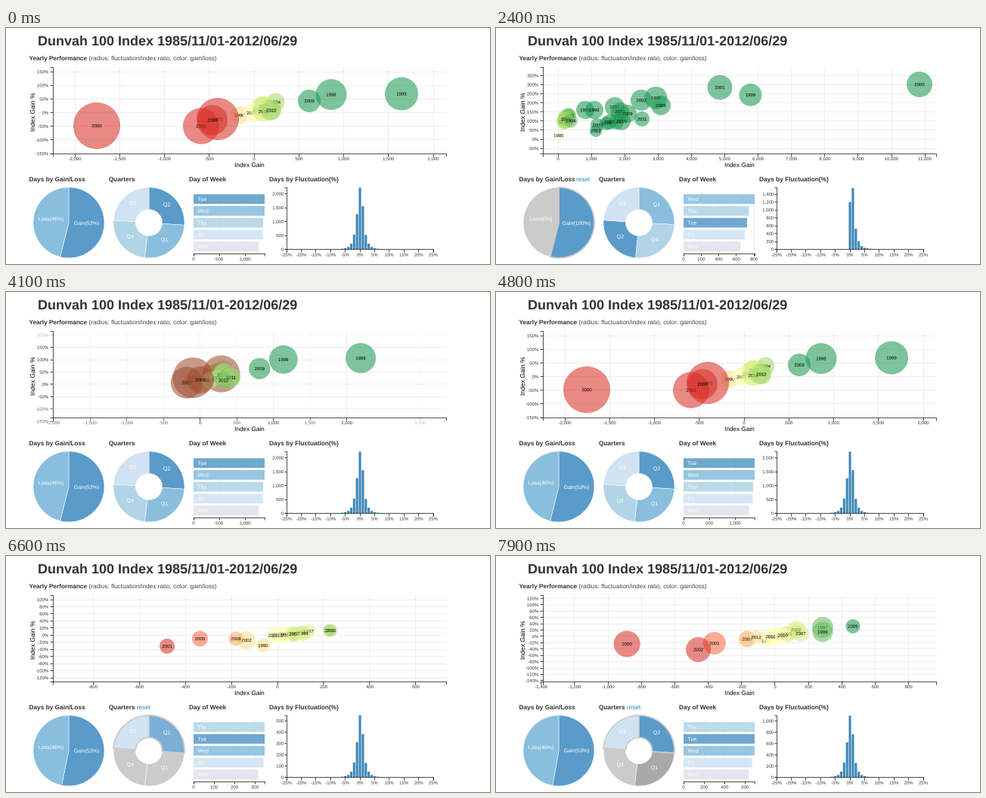
Recreate the animation shown at these times as a matplotlib script. Size 640x314 px, loop 8000 ms.

```python
import numpy as np
import matplotlib.pyplot as plt
from matplotlib.animation import FuncAnimation
from matplotlib.collections import PathCollection
from matplotlib.colors import to_rgb
from matplotlib.patches import Wedge
from matplotlib.path import Path
from matplotlib.textpath import TextPath

W, H, DPI = 640, 314, 100
FRAMES, STEP = 80, 100
PT = 72 / DPI

RD_YL_GN = ["#d73027", "#f46d43", "#fdae61", "#fee08b", "#ffffbf",
            "#d9ef8b", "#a6d96a", "#66bd63", "#1a9850"]
BLUES = ["#3182bd", "#6baed6", "#9ecae1", "#c6dbef", "#dadaeb"]
DAY_COLOR = dict(zip(["Tue", "Wed", "Thu", "Fri", "Mon"], BLUES))
SLICE_COLOR = dict(zip(["Q2", "Q1", "Q4", "Q3"], BLUES), Gain=BLUES[0], Loss=BLUES[1])
YEARS = range(1985, 2013)

# Filter clicks: time in ms, then the view they lead to
CLICKS = [(840, "gain"), (3225, "all"), (4916, "q3"), (6520, "q23")]
SLOW, FAST = 1500, 750

# Scales: pixel of zero, pixels per unit, first tick, last tick, tick step
X_SCALE = {"all": (328, .1185, -2000, 2000, 500), "gain": (82, .0441, 0, 11000, 1000),
           "q3": (359, .305, -800, 600, 200), "q23": (369, .2207, -1400, 800, 200)}
Y_SCALE = {"all": (112.6, -.363, -150, 150, 50), "gain": (148, -.242, -50, 350, 50),
           "q3": (105.3, -.4727, -120, 100, 20), "q23": (107, -.42, -140, 120, 20)}
ROW_SCALE = {"all": (248, .0682, 0, 1000, 500), "gain": (248, .1163, 0, 800, 200),
             "q3": (248, .271, 0, 300, 100), "q23": (248, .1355, 0, 600, 200)}
BAR_SCALE = {"all": (294.5, -.037, 0, 2000, 500), "gain": (294.5, -.0525, 0, 1400, 200),
             "q3": (294.5, -.151, 0, 500, 100), "q23": (294.5, -.075, 0, 1000, 200)}

# Bubbles that stand clear of the cluster: x, y, radius
BUBBLES = {
    "all": {2000: (120, 130, 31), 2001: (280, 121, 28), 2002: (258, 130.5, 24),
            2008: (273, 122.5, 20), 1990: (309, 116, 12), 2005: (325, 113, 12),
            2010: (349, 109, 14), 2011: (340, 111, 14), 2012: (351, 109.5, 13),
            2009: (401, 97, 15), 1998: (430, 88.5, 20.5), 1999: (523, 87.5, 22),
            1985: (331, 111, 7)},
    "gain": {2000: (560, 75, 17), 2001: (296, 79, 16.5), 1999: (336.5, 89, 15),
             2002: (192, 96, 14), 1998: (211.5, 93, 15), 2008: (218, 103, 13),
             1997: (157, 105, 13), 1996: (130, 109, 12), 1995: (118, 109, 12),
             2003: (164, 111, 12), 2009: (174, 114, 12), 2010: (166, 124, 12),
             2011: (193, 121, 10), 2004: (159, 125, 10), 2005: (134, 129, 9),
             2006: (146, 127, 9), 2007: (150, 125, 10), 2012: (132, 137, 8),
             1994: (99, 123.5, 9), 1990: (90, 125, 10), 1985: (83, 143, 5)},
    "q3": {2001: (213, 120, 10), 2000: (256.5, 110, 10.5), 2008: (304, 110, 9.5),
           2002: (318, 112, 12), 1990: (340, 119, 9), 2011: (353, 105.5, 9),
           1998: (360, 106, 10), 2012: (359, 105.3, 5), 2006: (367, 104.5, 8),
           2007: (381, 103.5, 10), 1999: (393, 103, 10), 1997: (400, 100, 9),
           2009: (427, 99, 8), 2010: (429.5, 99, 8.5)},
    "q23": {2000: (173, 117, 17.5), 2002: (267.5, 124.5, 16.5), 2001: (289, 116, 15),
            2008: (332, 110.5, 11), 2012: (344, 108, 9), 1990: (358, 113, 8),
            2011: (363, 107, 9), 2010: (379, 105.5, 11), 2007: (403, 103, 11),
            1996: (397, 98, 12), 1997: (432, 95, 14), 1999: (432, 101, 13.5),
            2009: (472, 93.5, 9.5)},
}
# Everyone else: cluster centre, half spread and smallest radius
CLUSTER = {"all": (344, 104, 15, -7, 10), "gain": (96, 116, 4, -6, 8),
           "q3": (375, 103.5, 18, -3, 6.5), "q23": (380, 104.5, 19, -5, 7.5)}

ROWS = {"all": (["Tue", "Wed", "Thu", "Fri", "Mon"], [94, 94, 92, 91.5, 86.5]),
        "gain": (["Wed", "Thu", "Tue", "Fri", "Mon"], [94, 86.5, 84, 81, 75.5]),
        "q3": (["Wed", "Thu", "Tue", "Fri", "Mon"], [94, 94, 94, 92.5, 85.5]),
        "q23": (["Thu", "Tue", "Wed", "Fri", "Mon"], [94, 94, 94, 90.5, 86])}
QUARTERS = {"all": (["Q2", "Q1", "Q4", "Q3"], [0, 94, 187, 274, 360]),
            "gain": (["Q1", "Q4", "Q2", "Q3"], [0, 93, 185.5, 274, 360])}
QUARTERS["q3"] = QUARTERS["q23"] = QUARTERS["all"]
GAIN_END = {"all": 194, "gain": 194, "q3": 191.5, "q23": 190}
PICKED = {"all": [], "gain": ["Gain"], "q3": ["Q3"], "q23": ["Q2", "Q3"]}

PCT = np.arange(-7, 9)
SHAPE = np.array([10, 22, 45, 90, 205, 530, 1260, 2220, 1550, 520, 205, 85, 42, 24, 14, 6])
COUNTS = {"all": SHAPE, "gain": np.where(PCT < 0, 0, np.where(PCT == 0, 1200, SHAPE)),
          "q3": SHAPE * .246, "q23": SHAPE * .4923}

rng = np.random.default_rng(7)
JITTER = {y: rng.uniform(-1, 1, 3) for y in YEARS}


def bubble(view, year):
    """x, y, radius and colour of a year's bubble."""
    if year in BUBBLES[view]:
        x, y, r = BUBBLES[view][year]
    else:
        cx, cy, sx, sy, r0 = CLUSTER[view]
        u, v, w = JITTER[year]
        x, y, r = cx + sx * u, cy + sy * u + 1.5 * v, r0 + 2 * (w + 1)
    zero, k = X_SCALE[view][:2]
    shade = int(np.clip(((x - zero) / k + 500) / 1000 * 9, 0, 8))
    return np.array([x, y, r, *to_rgb(RD_YL_GN[shade])])


PLACED = {v: {y: bubble(v, y) for y in YEARS} for v in X_SCALE}

fig = plt.figure(figsize=(W / DPI, H / DPI), dpi=DPI, facecolor="white")
ax = fig.add_axes([0, 0, 1, 1])
ax.set(xlim=(0, W), ylim=(H, 0))
ax.axis("off")
# The whole picture is one collection of paths, painted in order
scene = PathCollection([Path([(0, 0), (1, 1)])], transform=ax.transData, snap=False)
ax.add_collection(scene, autolim=False)
shapes = []
glyphs = {}
CLEAR = (0, 0, 0, 0)


def ease(t):
    t = min(max(t, 0), 1)
    return 4 * t ** 3 if t < .5 else 1 - 4 * (1 - t) ** 3


def mix(a, b, p):
    return np.asarray(a) * (1 - p) + np.asarray(b) * p


def tint(color, alpha):
    return mix((1, 1, 1), to_rgb(color), alpha)


def rgba(color, alpha=1):
    return (*to_rgb(color), alpha)


def fill(path, face, edge=CLEAR, width=0):
    shapes.append((path, face, edge, width * PT))


def rect(x, y, w, h, color):
    fill(Path([(x, y), (x + w, y), (x + w, y + h), (x, y + h), (x, y)]), rgba(color))


def line(xs, ys, color="#222222", alpha=1):
    points = np.floor(np.column_stack([xs, ys])) + .5
    fill(Path(points), CLEAR, rgba(color, alpha), .8)


def text(x, y, s, size=6, color="#333333", ha="left", alpha=1, bold=False, upright=False):
    key = s, bold
    if key not in glyphs:
        font = {"family": "Liberation Sans", "weight": "bold" if bold else "normal"}
        path = TextPath((0, 0), s, size=100, prop=font)
        box = path.get_extents()
        glyphs[key] = path.vertices / 100, path.codes, box.x0 / 100, box.x1 / 100
    points, codes, x0, x1 = glyphs[key]
    shift = {"left": 0, "center": (x0 + x1) / 2, "right": x1}[ha]
    u, v = (points[:, 0] - shift) * size, (points[:, 1] - .36) * size
    place = (x - v, y - u) if upright else (x + u, y - v)
    fill(Path(np.column_stack(place), codes), rgba(color, alpha))


def ticks(scales, old, new, p):
    """Position, value and opacity of each tick while a scale changes."""
    a, b = scales[old], scales[new]
    va, vb = (set(range(s[2], s[3] + 1, s[4])) for s in (a, b))
    zero, k = mix(a[:2], b[:2], p)
    for v in sorted(va | vb):
        alpha = 1 if v in va and v in vb else p if v in vb else 1 - p
        if alpha > .01:
            yield zero + k * v, v, alpha


def bubble_chart(old, new, p):
    xs = list(ticks(X_SCALE, old, new, p))
    ys = list(ticks(Y_SCALE, old, new, p))
    for x, _, a in xs:
        if 62 < x < 582:
            line([x, x], [52, 167], "#eaeaea", a)
    for y, _, a in ys:
        if 52 < y < 167:
            line([62, 582], [y, y], "#eaeaea", a)
    for year in YEARS:
        x, y, r, *rgb = mix(PLACED[old][year], PLACED[new][year], p)
        fill(Path.circle((x, y), r), (*rgb, .57))
        text(x, y, str(year), 6, "black", "center")
    line([58, 62, 62, 58], [52, 52, 167, 167])
    line([62, 62, 582, 582], [171, 167, 167, 171])
    for x, v, a in xs:
        if 38 < x < 612:
            line([x, x], [167, 171], alpha=a)
            text(x, 173.8, f"{v:,}", ha="center", alpha=a)
    for y, v, a in ys:
        if 48 < y < 178:
            line([58, 62], [y, y], alpha=a)
            text(56, y, f"{v}%", ha="right", alpha=a)
    text(322, 182, "Index Gain", 8.2, "black", "center")
    text(35, 112, "Index Gain %", 8.6, "black", "center", upright=True)


def pie(cx, inner, names, edges, colors, labels, picked, hover):
    cy, outer = 259, 47
    parts = list(zip(names, edges, edges[1:], colors))
    for name, a, b, color in sorted(parts, key=lambda part: part[0] in picked):
        on = name in picked
        if picked and not on:
            face = "#a9a9a9" if name == hover else "#cbcbcb"
        else:
            face = tint(color, .64 if name == hover else .8)
        ring = Wedge((cx, cy), outer, a - 90, b - 90, width=outer - inner)
        fill(ring.get_path(), rgba(face), rgba("#cccccc" if on else "white"),
             1.8 if on else .5)
    for name, a, b, _ in parts:
        mid, r = np.radians((a + b) / 2), (outer + inner) / 2
        text(cx + r * np.sin(mid), cy - r * np.cos(mid) - 2.4, labels.get(name, name),
             7, "white", "center")


def pies(old, new, p, hover):
    picked = PICKED[new]
    names = ["Gain", "Loss"]
    share = (100, 0) if new == "gain" else (53, 46)
    labels = {n: f"{n}({s}%)" for n, s in zip(names, share)}
    edges = [0, mix(GAIN_END[old], GAIN_END[new], p), 360]
    pie(83, 0, names, edges, [SLICE_COLOR[n] for n in names], labels,
        [n for n in picked if n in names], hover)
    (na, ea), (nb, eb) = QUARTERS[old], QUARTERS[new]
    colors = [mix(to_rgb(SLICE_COLOR[a]), to_rgb(SLICE_COLOR[b]), p) for a, b in zip(na, nb)]
    pie(189, 17.5, nb, mix(ea, eb, p), colors, {}, [n for n in picked if n in nb], hover)


def row_chart(old, new, p):
    marks = [m for m in ticks(ROW_SCALE, old, new, p) if m[0] < 360]
    for x, _, a in marks:
        line([x, x], [217, 300], "#eaeaea", a)
    names, widths = ROWS[new][0], mix(ROWS[old][1], ROWS[new][1], p)
    for i, (name, w) in enumerate(zip(names, widths)):
        y = 221.2 + 15.75 * i
        rect(248, y, w, 12.8, tint(DAY_COLOR[name], .7))
        text(253.5, y + 6.4, name, 7, "white")
    line([248, 248, 342, 342], [303, 300, 300, 303])
    for x, v, a in marks:
        line([x, x], [300, 303], alpha=a)
        text(x, 307.3, f"{v:,}", ha="center", alpha=a)


def histogram(old, new, p):
    base = BAR_SCALE[new][0]
    before, after = (COUNTS[v] * -BAR_SCALE[v][1] for v in (old, new))
    for pct, h in zip(PCT, mix(before, after, p)):
        if h > .2:
            rect(466.5 + 3.88 * pct, base - h, 3.1, h, "#3d86b8")
    line([368, 371, 371, 368], [212, 212, base, base])
    line([371, 371, 565, 565], [298, base, base, 298])
    for y, v, a in ticks(BAR_SCALE, old, new, p):
        if 206 < y < 300:
            line([368, 371], [y, y], alpha=a)
            text(367, y, f"{v:,}", ha="right", alpha=a)
    for pct in range(-25, 26, 5):
        x = 468 + 3.88 * pct
        line([x, x], [base, 298])
        text(x, 301.6, f"{pct}%", ha="center")


def headings(view):
    text(42, 16.7, "Dunvah 100 Index 1985/11/01-2012/06/29", 18, bold=True)
    text(30.5, 40, "Yearly Performance", 8.2, bold=True)
    text(109.5, 40, "(radius: fluctuation/index ratio, color: gain/loss)", 8.2, "#444444")
    for x, s in ((30.5, "Days by Gain/Loss"), (136, "Quarters"), (242, "Day of Week"),
                 (348, "Days by Fluctuation(%)")):
        text(x, 201, s, 8.3, bold=True)
    if PICKED[view]:
        text(106 if view == "gain" else 173, 201, "reset", 8.2, "#1f83bd")


def hovered(t):
    if 6250 <= t < 7000:
        return "Q2"
    return "Q1" if t >= 7600 else None


def draw(i):
    t = i * STEP
    start, old, new = -SLOW, "all", "all"
    for when, view in CLICKS:
        if t >= when:
            start, old, new = when, new, view
    slow, fast = ease((t - start) / SLOW), ease((t - start) / FAST)
    shapes.clear()
    headings(new)
    bubble_chart(old, new, slow)
    pies(old, new, fast, hovered(t))
    row_chart(old, new, fast)
    histogram(old, new, fast)
    paths, faces, edges, widths = zip(*shapes)
    scene.set_paths(paths)
    scene.set_facecolor(faces)
    scene.set_edgecolor(edges)
    scene.set_linewidth(widths)
    return [scene]


anim = FuncAnimation(fig, draw, frames=FRAMES, init_func=lambda: [scene], interval=STEP,
                     repeat=True, repeat_delay=0, blit=False)
plt.show()
```
